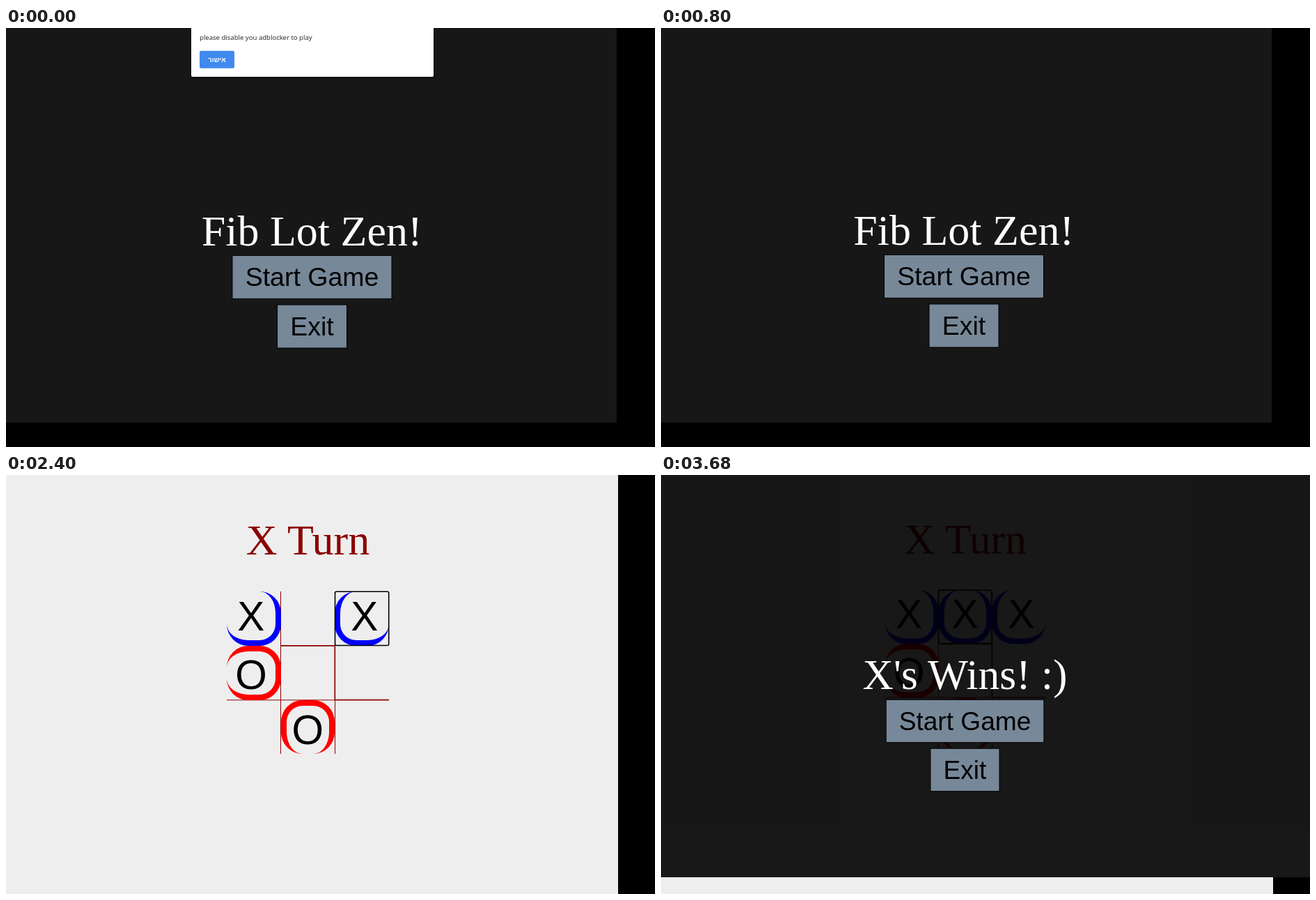
Animation, 932 px wide and 601 px high, one loop 4000 ms. Source, as an HTML page:

```html
<!DOCTYPE html>
<html lang="en">
<head>
<meta charset="utf-8">
<title>Board game</title>
<style>
  html, body { margin: 0; width: 100%; height: 100%; overflow: hidden; background: #000; }
  #stage { position: relative; width: 932px; height: 601px; overflow: hidden; }
  #stage div, #stage svg { position: absolute; left: 0; top: 0; }
  svg { width: 932px; height: 601px; overflow: visible; }

  /* --i is the 800 ms step at which a scene appears */
  .one, .two, .three {
    opacity: 0;
    animation: one 4s step-end infinite;
    animation-delay: calc((var(--i) - 5) * .8s);
  }
  .two { animation-name: two; }
  .three { animation-name: three; }
  @keyframes one { 0% { opacity: 1 } 20%, 100% { opacity: 0 } }
  @keyframes two { 0% { opacity: 1 } 40%, 100% { opacity: 0 } }
  @keyframes three { 0% { opacity: 1 } 60%, 100% { opacity: 0 } }

  .page { width: 879px; height: 601px; background: #eee; }
  .wide { width: 932px; height: 577px; background: #eee; }
  .dark { width: 877px; height: 566px; background: #171717; }
  .veil { width: 932px; height: 577px; background: rgba(0, 0, 0, .9); }
  #stage .dialog {
    left: 266px; width: 347.5px; height: 70px; background: #fff;
    border-radius: 0 0 2px 2px; box-shadow: 0 1px 3px rgba(0, 0, 0, .5);
  }

  .board { inset: 0; transform-origin: 0 0; animation: shift 4s step-end infinite; }
  @keyframes shift {
    0% { transform: none }
    80%, 100% { transform: translate(7.8px, -.3px) scale(.99) }
  }
  #stage .cell {
    left: calc(317px + var(--c) * 77.6px);
    top: calc(167px + var(--r) * 77.8px);
    width: 77.6px; height: 77.8px; box-sizing: border-box;
    border: 8px solid blue; border-radius: 31px;
  }
  #stage .o { border-color: red; }

  text { text-anchor: middle; }
  .title { font: 62px "Liberation Serif", "Times New Roman", serif; fill: #fff; }
  .sans { font-family: "Liberation Sans", Arial, sans-serif; }
  .open { font-family: "Open Sans", "Noto Sans", sans-serif; }
  .lato { font-family: Lato, sans-serif; }
  .left { text-anchor: start; }
</style>
</head>
<body>
<div id="stage">
  <div class="two dark" style="--i:0"></div>
  <div class="three page" style="--i:2"></div>
  <div class="one wide" style="--i:4"></div>

  <!-- opening menu -->
  <div class="one" style="--i:0">
    <div class="dialog"></div>
    <svg>
      <defs>
        <g id="menu" class="sans" font-size="37.5">
          <g fill="#789" stroke="#000">
            <rect x="-114.5" y=".3" width="229" height="62"/>
            <rect x="-50" y="71" width="100" height="62"/>
          </g>
          <text y="44.3">Start Game</text>
          <text y="115">Exit</text>
        </g>
      </defs>
      <text class="open left" x="278" y="16.5" font-size="9.6" fill="#222">please disable you adblocker to play</text>
      <rect x="278" y="32.7" width="50" height="25" rx="2" fill="#4089ee"/>
      <text class="sans" x="303" y="48.5" font-size="9.5" font-weight="700" fill="#fff">אישור</text>
      <text class="title" x="439.2" y="311.5">Fib Lot Zen!</text>
      <use href="#menu" transform="translate(439.5 326)"/>
    </svg>
  </div>
  <svg class="one" style="--i:1">
    <text class="title" x="434.7" y="310.5">Fib Lot Zen!</text>
    <use href="#menu" transform="translate(435 325)"/>
  </svg>

  <!-- advert -->
  <svg class="one" style="--i:2">
    <rect x="187" y="221" width="497" height="279.5" fill="#fffdff"/>
    <path d="M187.5 221V500.5" stroke="#aaa"/>
    <circle cx="215" cy="256.5" r="14" fill="#4aa646"/>
    <g class="open" font-size="25">
      <text class="left" x="232" y="254" fill="#45a842">jub</text>
      <text class="left" x="273.5" y="254" fill="#7f7f7f">video</text>
    </g>
    <text class="left" x="233.5" y="268" font-family="Liberation Serif, serif" font-size="10" fill="#777">by Orvask</text>
    <g class="lato">
      <text x="436.5" y="347.5" font-size="45.5" fill="#45a842">Linear Inline</text>
      <text x="436" y="388.5" font-size="34.5" fill="#7f7f7f">8 Seconds</text>
    </g>
  </svg>

  <!-- game board -->
  <div class="two" style="--i:3">
    <div class="board">
      <svg>
        <g fill="none" stroke="#8b0000">
          <path d="M394.5 167V400M472.5 167V400M317 322.8H550"/>
          <path d="M395 244.8H472M472.3 245V323M472 322.5H550" stroke-width="1.7"/>
        </g>
        <text class="title" x="433.5" y="114" style="fill:#8b0000">X Turn</text>
      </svg>
      <div class="cell" style="--c:0; --r:0; border-width:0 8px 8px 0"></div>
      <div class="cell" style="--c:2; --r:0; border-width:0 0 8px 8px"></div>
      <div class="cell o" style="--c:0; --r:1; border-width:8px 8px 8px 0"></div>
      <div class="cell o" style="--c:1; --r:2; border-width:8px 8px 0 8px"></div>
      <div class="one" style="--i:4">
        <div class="cell" style="--c:1; --r:0; border-width:0 8px 8px 8px"></div>
      </div>
      <svg class="sans" font-size="58.5">
        <text x="351.7" y="222.5">X</text>
        <text x="514.8" y="222.5">X</text>
        <text x="352" y="307">O</text>
        <text x="433.3" y="386">O</text>
        <g fill="none" stroke="#000" stroke-width="1.6">
          <rect class="one" style="--i:3" x="472.5" y="167.3" width="77.2" height="77.2" rx="2"/>
          <rect class="one" style="--i:4" x="394.8" y="167.3" width="77.2" height="77.2" rx="2"/>
        </g>
        <text class="one" style="--i:4" x="433" y="222.5">X</text>
      </svg>
    </div>
  </div>

  <!-- result -->
  <div class="one" style="--i:4">
    <div class="veil"></div>
    <svg>
      <g transform="translate(436.5 322) scale(.99)">
        <text class="title" y="-15">X's Wins! :)</text>
        <use href="#menu"/>
      </g>
    </svg>
  </div>
</div>
</body>
</html>
```
